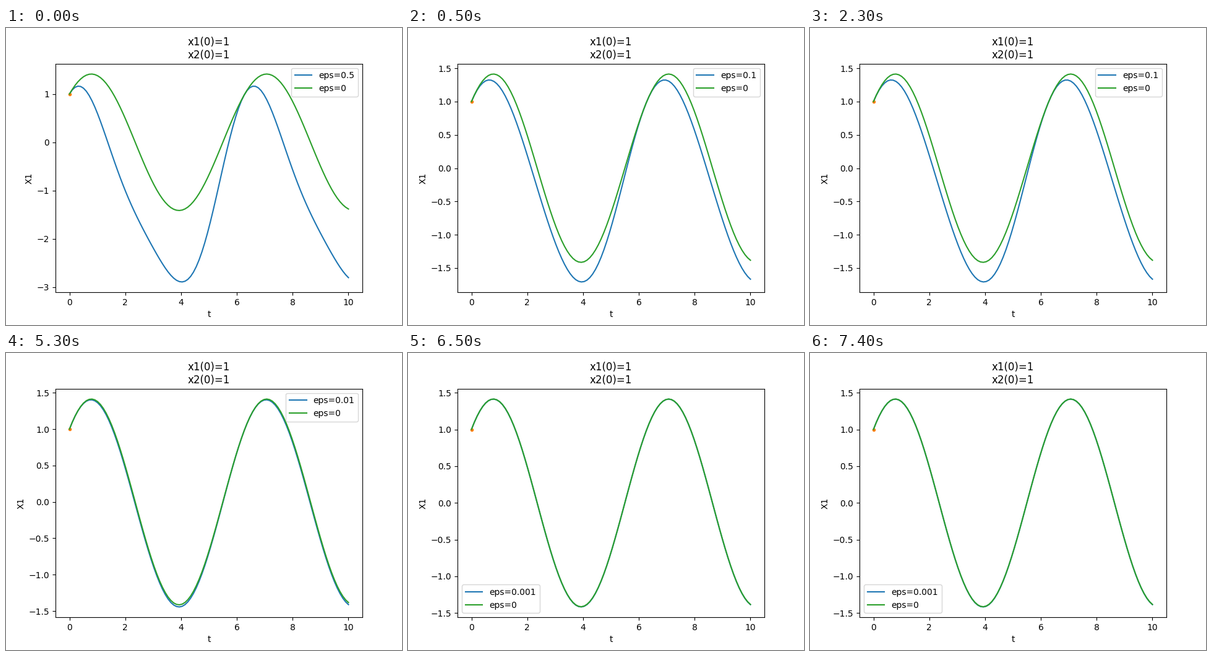
These frames come from a looping animation (640x480 px, 8000 ms). A matplotlib script:

```python
import numpy as np
import matplotlib.pyplot as plt
from matplotlib.animation import FuncAnimation

STEP_MS = 500
FRAMES = 16

# (first frame, epsilon, legend place)
STAGES = [
    (0, 0.5, "upper right"),
    (1, 0.1, "upper right"),
    (7, 0.01, "upper right"),
    (13, 0.001, "lower left"),
]

t = np.linspace(0, 10, 100)
fig, ax = plt.subplots(figsize=(6.4, 4.8), dpi=100)


def solution(eps):
    """First-order expansion of x'' + x = -eps (x + x')^2 with x = x' = 1 at 0."""
    base = np.cos(t) + np.sin(t)
    correction = -2 + 4 / 3 * np.cos(t) + 2 / 3 * np.cos(2 * t)
    return base + eps * correction


def draw(frame):
    _, eps, place = [s for s in STAGES if s[0] <= frame][-1]
    ax.clear()
    ax.plot(t, solution(eps), color="C0", label=f"eps={eps}")
    ax.plot(0, 1, ".", color="C1")
    ax.plot(t, solution(0), color="C2", label="eps=0")
    ax.set_title("x1(0)=1\nx2(0)=1")
    ax.set_xlabel("t")
    ax.set_ylabel("X1")
    ax.legend(loc=place)
    return []


anim = FuncAnimation(fig, draw, frames=FRAMES, interval=STEP_MS,
                     init_func=lambda: draw(0), repeat=True, repeat_delay=0)
plt.show()
```
